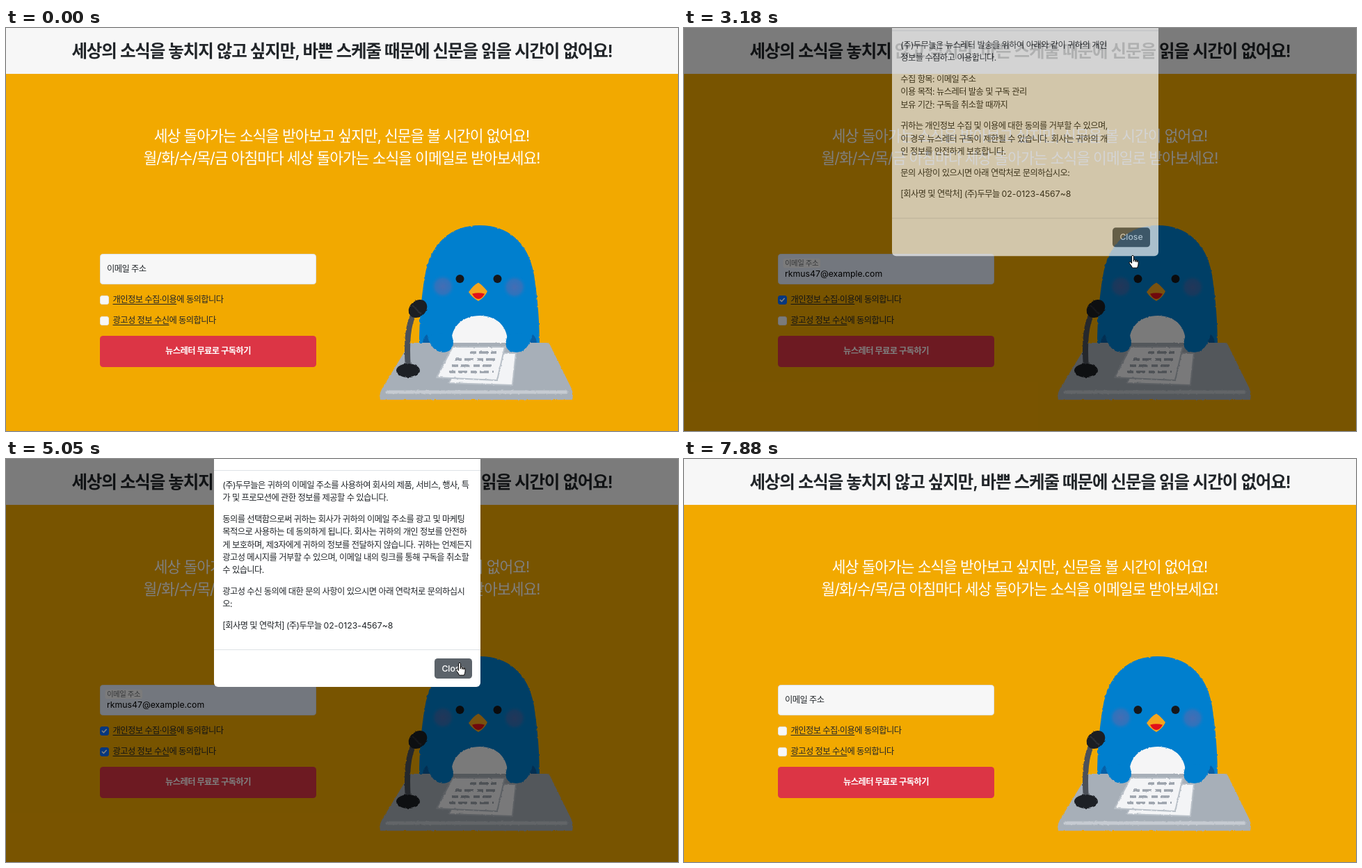
Write an HTML page that moves like this. It is 966 px wide and 580 px high and loops after 8000 ms.

```html
<!DOCTYPE html>
<html lang="ko">
<head>
<meta charset="utf-8">
<title>뉴스레터 구독</title>
<style>
html { font-size: 12.27px; }
html, body { margin: 0; width: 966px; height: 580px; overflow: hidden; }
body {
  position: relative; background: #f2a900; color: #212529;
  font: 1rem/1.5 Inter, "Noto Sans CJK KR", "Noto Sans CJK", sans-serif;
  white-space: nowrap;
}
body > * { letter-spacing: -.045em; }
body > *, .field > * { position: absolute; box-sizing: border-box; }
.latin { letter-spacing: 0; }
h1 {
  left: 0; top: 0; width: 966px; height: 66px; margin: 0; background: #f7f7f7;
  font-size: 2rem; font-weight: 600; line-height: 66px; text-align: center;
}
.lead { left: 0; top: 139px; width: 965px; color: #fff; font-size: 1.75rem; text-align: center; }
svg { overflow: visible; }
.art { left: 0; top: 0; }
.field {
  left: 135px; top: 324.5px; width: 311px; height: 44.5px;
  background: #f7f7f7; border: 1px solid #dee2e6; border-radius: 4.6px;
}
.field label { left: 9px; top: 12px; transform-origin: 0 50%; isolation: isolate; }
.field label::before {
  content: ""; position: absolute; z-index: -1; inset: 1px -3.5px;
  border-radius: 4px; background: #f7f7f7; opacity: var(--p);
}
.mail { left: 9px; top: 19.5px; color: #000; }
.box {
  left: 135px; width: 12.5px; height: 12.5px; border-radius: 3px;
  background: #f7f7f7; border: 1px solid #e6e6e6;
}
.box svg { position: absolute; left: -1px; top: -1px; display: none; }
.box.on { background: #0d6efd; border-color: #0d6efd; }
.box.on svg { display: block; }
.box.press { filter: brightness(.9); }
.box.ring { border-color: #86b7fe; box-shadow: 0 0 0 3px rgba(13,110,253,.25); }
.agree { left: 153.5px; }
u { text-underline-offset: 1.5px; text-decoration-thickness: 1px; }
.submit {
  left: 135px; top: 443px; width: 311px; height: 45px; border-radius: 4.6px;
  background: #dc3545; color: #fff; font-weight: 700; line-height: 44px; text-align: center;
}
.submit.hover { background: #bb2d3b; }
.shade { inset: 0; background: rgba(0,0,0,.5); }
.modal {
  left: 299px; top: -32px; width: 383px; background: #fff; border-radius: 6px;
}
.modal header { height: 47.5px; border-bottom: 1px solid #dee2e6; }
.modal section { padding: 1rem; }
.modal p { margin: 0 0 1rem; }
.modal footer { padding: 1rem; border-top: 1px solid #dee2e6; text-align: right; font-size: 0; }
.modal b { font-weight: 600; }
.btn {
  display: inline-block; padding: .43rem .82rem; border-radius: 4.6px;
  font-size: 1rem; color: #fff; font-weight: 500; background: #6c757d;
}
.btn.hover { background: #5c636a; }
.btn.ok { background: #0d6efd; font-weight: 600; }
.btn.ok.hover { background: #0b5ed7; }
.cursor { left: 0; top: 0; width: 1px; height: 1px; }
.cursor path { display: none; stroke: #000; stroke-width: 1; fill: #fff; stroke-linejoin: round; }
.cursor path.show { display: block; }
</style>
</head>
<body>
<h1>세상의 소식을 놓치지 않고 싶지만, 바쁜 스케줄 때문에 신문을 읽을 시간이 없어요!</h1>
<div class="lead">세상 돌아가는 소식을 받아보고 싶지만, 신문을 볼 시간이 없어요!<br>월/화/수/목/금 아침마다 세상 돌아가는 소식을 이메일로 받아보세요!</div>

<svg class="art" width="966" height="580">
  <defs>
    <filter id="rough" x="-5%" y="-5%" width="110%" height="110%" color-interpolation-filters="sRGB">
      <feTurbulence type="fractalNoise" baseFrequency=".25" numOctaves="2" seed="4"/>
      <feDisplacementMap in="SourceGraphic" scale="2.5" xChannelSelector="R" yChannelSelector="G"/>
    </filter>
    <radialGradient id="cheek">
      <stop offset="0" stop-color="#456db3"/>
      <stop offset=".6" stop-color="#3a70b8" stop-opacity=".8"/>
      <stop offset="1" stop-color="#007fce" stop-opacity="0"/>
    </radialGradient>
  </defs>
  <g filter="url(#rough)">
    <path fill="#007fce" d="M594 458C594 420 597 388 602 358C610 308 641 284 681 284C721 284 751 308 759 355C764 388 767 420 767 458Z"/>
    <path fill="#075fa6" d="M599 456Q599 445 605 441Q608 449 613 456ZM763 456Q763 445 757 441Q754 449 750 456Z"/>
    <path fill="#f5f5f6" d="M640 458C638 428 658 414 681 414C704 414 723 428 721 458Z"/>
    <path fill="#a7afb8" d="M584 453H777Q781 453 783 458L813 519Q816 527 814 535H538Q536 527 540 520L577 459Q580 453 584 453Z"/>
    <path stroke="#c6cbd2" stroke-width="5" stroke-linecap="round" d="M548 524H805"/>
    <path fill="#007fce" d="M606 445Q624 434 641 443Q646 458 638 464Q628 470 617 463Q610 457 606 445ZM756 445Q738 434 721 443Q715 458 723 464Q734 470 745 463Q752 457 756 445Z"/>
    <g fill="#f3f4f6" stroke="#b9c0c8" stroke-width="2" stroke-linejoin="round">
      <path d="M655 467L733 468L728 514L637 511Z"/>
      <path d="M642 459L717 459L706 507L619 503Z"/>
    </g>
    <path fill="none" stroke="#9ca3ac" stroke-width="3.4" stroke-dasharray="9 4 13 5" d="M667 467H705M646 477H704M641 486H703M637 495H701"/>
    <path fill="none" stroke="#4b5058" stroke-width="8" d="M578 490C576 462 576 428 587 410"/>
    <ellipse cx="578" cy="493" rx="17" ry="10" fill="#1d2025"/>
    <ellipse cx="592" cy="404" rx="14.5" ry="11.5" fill="#1b1e23" transform="rotate(-42 592 404)"/>
    <path stroke="#2c3036" stroke-width="2" d="M584 399L597 412"/>
  </g>
  <circle cx="628" cy="372" r="18" fill="url(#cheek)"/>
  <circle cx="731" cy="373" r="18" fill="url(#cheek)"/>
  <circle cx="652.5" cy="361" r="6" fill="#15171b"/>
  <circle cx="706.5" cy="361" r="6" fill="#15171b"/>
  <path fill="#f4a51e" d="M679 366.5Q685 370 692 379Q688 388 679 393Q670 388 665 380Q672 370 679 366.5Z"/>
  <path fill="#e2101a" d="M670 382.5Q679 380 688 382.5Q684 390 679 390Q674 390 670 382.5Z"/>
</svg>

<div class="field"><label>이메일 주소</label><span class="mail latin">rkmus47@example.com</span></div>
<div class="box" style="top:385px"></div>
<div class="agree" style="top:381.5px"><u>개인정보 수집·이용</u>에 동의합니다</div>
<div class="box" style="top:415px"></div>
<div class="agree" style="top:412px"><u>광고성 정보 수신</u>에 동의합니다</div>
<div class="submit">뉴스레터 무료로 구독하기</div>

<div class="shade"></div>
<div class="modal"><header></header><section>
  <p>(주)두무늘은 뉴스레터 발송을 위하여 아래와 같이 귀하의 개인<br>정보를 수집하고 이용합니다.</p>
  <p>수집 항목: 이메일 주소<br>이용 목적: 뉴스레터 발송 및 구독 관리<br>보유 기간: 구독을 취소할 때까지</p>
  <p>귀하는 개인정보 수집 및 이용에 대한 동의를 거부할 수 있으며,<br>이 경우 뉴스레터 구독이 제한될 수 있습니다. 회사는 귀하의 개<br>인 정보를 안전하게 보호합니다.</p>
  <p>문의 사항이 있으시면 아래 연락처로 문의하십시오:</p>
  <p>[회사명 및 연락처] (주)두무늘 <span class="latin">02-0123-4567~8</span></p>
</section><footer><span class="btn latin">Close</span></footer></div>
<div class="modal"><header></header><section>
  <p>(주)두무늘은 귀하의 이메일 주소를 사용하여 회사의 제품, 서비스, 행사, 특<br>가 및 프로모션에 관한 정보를 제공할 수 있습니다.</p>
  <p>동의를 선택함으로써 귀하는 회사가 귀하의 이메일 주소를 광고 및 마케팅<br>목적으로 사용하는 데 동의하게 됩니다. 회사는 귀하의 개인 정보를 안전하<br>게 보호하며, 제3자에게 귀하의 정보를 전달하지 않습니다. 귀하는 언제든지<br>광고성 메시지를 거부할 수 있으며, 이메일 내의 링크를 통해 구독을 취소할<br>수 있습니다.</p>
  <p>광고성 수신 동의에 대한 문의 사항이 있으시면 아래 연락처로 문의하십시<br>오:</p>
  <p>[회사명 및 연락처] (주)두무늘 <span class="latin">02-0123-4567~8</span></p>
</section><footer><span class="btn latin">Close</span></footer></div>
<div class="modal"><header></header><section>
  <p>입력하신 이메일 주소로 전송된 <b>메일 안의 링크를 클릭</b>하시면 인증이 완료됩<br>니다.</p>
  <p>5분 정도만 기다려주시면 구독한 내용을 받아보실 수 있습니다.</p>
  <p>만약 수신된 메일을 찾을 수 없다면 스팸 메일함을 확인하시거나 문제가 계<br>속되면 언제든지 페이지 우측 하단의 새솔담소 채널로 연락주세요.</p>
  <p>감사합니다.</p>
</section><footer><span class="btn ok">확인했습니다</span></footer></div>

<svg class="cursor">
  <path data-kind="arrow" d="M.5 .5V13.7L3.4 11L5.4 15.8L7.6 14.9L5.6 10.2H9.6Z"/>
  <path data-kind="beam" d="M-3-7.5H-1L0-6.5L1-7.5H3M0-6.5V6.5M-3 7.5H-1L0 6.5L1 7.5H3" style="fill:none"/>
  <path data-kind="hand" d="M-1.4 1.2Q0-.9 1.4 1.2V9V6.8Q2.7 5.5 3.9 7.2V9.5V7.2Q5.2 6.3 6.2 7.9V10V7.9Q7.7 7.3 8.1 9V13Q7.7 15.6 6.5 18.2H-.4Q-1.8 15-4.6 11.8Q-5.8 9.6-3.6 9.4L-1.4 11.4Z"/>
</svg>

<script>
const LOOP = 8000, START = 400, STEP = 98.4;
const all = s => [...document.querySelectorAll(s)];
const [field, label, mail, submit, shade, cursor] =
  ['.field', '.field label', '.mail', '.submit', '.shade', '.cursor'].map(s => all(s)[0]);
const boxes = all('.box'), modals = all('.modal'), shapes = all('.cursor path');
const clamp = v => Math.max(0, Math.min(1, v));

boxes.forEach(b => b.innerHTML =
  '<svg width="12.5" height="12.5"><path d="M3.4 6.5L5.4 8.5L9.2 4.3" fill="none" stroke="#fff" stroke-width="1.7" stroke-linecap="round" stroke-linejoin="round"/></svg>');

// pointer path: step, x, y, shape
const path = [
  [0, 654, 524, 'arrow'], [4, 358, 352, 'beam'], [7, 358, 352, 'beam'], [8, 350, 360, 'beam'],
  [9, 330, 375, 'arrow'], [12, 280, 406, 'arrow'], [14, 280, 406, 'arrow'], [22, 149, 388, 'arrow'],
  [23, 147, 387, 'arrow'], [24, 147, 387, 'arrow'], [27, 645, 327, 'hand'], [28, 645, 327, 'hand'],
  [29, 610, 334, 'arrow'], [32, 392, 387, 'arrow'], [34, 142, 420, 'arrow'], [36, 142, 420, 'arrow'],
  [38, 198, 419, 'arrow'], [39, 198, 419, 'arrow'], [44, 646, 284, 'arrow'], [45, 646, 284, 'arrow'],
  [46, 650, 292, 'hand'], [47, 652, 293, 'hand'], [48, 652, 293, 'hand'], [49, 610, 318, 'arrow'],
  [53, 366, 470, 'hand'], [56, 366, 470, 'hand'], [57, 390, 452, 'arrow'], [62, 648, 241, 'arrow'],
  [64, 653, 241, 'hand'], [65, 653, 241, 'hand'], [66, 645, 254, 'hand'], [68, 645, 250, 'hand'],
  [69, 645, 232, 'arrow'], [74, 640, 82, 'arrow'], [75, 669, 2, 'arrow'], [76, 672, -30, 'arrow']
];

// dialogs: opening step, steps to open, closing step, step of button hover
const dialogs = [[24, 3, 27, 27], [35, 3, 48, 46], [55, 1, 66, 61]];

function drawCursor(n) {
  const i = path.findLastIndex(k => k[0] <= n);
  const on = i >= 0 && i < path.length - 1;
  cursor.style.display = on ? 'block' : 'none';
  if (!on) return;
  const [a, x, y, kind] = path[i], [b, x2, y2] = path[i + 1];
  const u = (n - a) / (b - a), e = u * u * (3 - 2 * u);
  cursor.style.transform = `translate(${x + (x2 - x) * e}px,${y + (y2 - y) * e}px)`;
  shapes.forEach(s => s.classList.toggle('show', s.dataset.kind === kind));
}

function drawForm(n) {
  const live = n < 71;
  const float = live ? clamp((n - 6) / 2) : 0;
  const ring = n < 23 ? clamp((n - 6) / 2) : n === 23 ? .85 : 0;
  const filled = live && n >= 12;
  label.style.transform = `translateY(${-8.5 * float}px) scale(${1 - .15 * float})`;
  label.style.color = `rgba(33,37,41,${1 - .35 * float})`;
  label.style.setProperty('--p', float);
  mail.style.display = filled ? 'block' : 'none';
  field.style.background = filled ? '#e8f0fe' : '#f7f7f7';
  field.style.borderColor = ring ? '#86b7fe' : '#dee2e6';
  field.style.boxShadow = `0 0 0 3px rgba(13,110,253,${.25 * ring})`;
  boxes.forEach((b, i) => {
    const down = [23, 34][i];
    b.classList.toggle('press', n === down);
    b.classList.toggle('ring', n === down || n === down + 1);
    b.classList.toggle('on', live && n > down);
  });
  submit.classList.toggle('hover', n === 53 || n === 54);
}

function drawDialogs(n) {
  let dark = 0;
  dialogs.forEach(([open, rise, close, hover], i) => {
    const p = Math.min(clamp((n - open + 1) / rise), clamp(1 - (n - close) / 3));
    dark = Math.max(dark, Math.min(clamp((n - open + 1) / Math.min(rise, 2)), clamp(1 - (n - close - 3) / 2)));
    const m = modals[i];
    m.style.display = p ? 'block' : 'none';
    m.style.opacity = p;
    m.style.transform = `translateY(${-38 * (1 - p)}px)`;
    m.querySelector('.btn').classList.toggle('hover', n >= hover);
  });
  shade.style.opacity = dark;
}

function frame() {
  const t = performance.now() % LOOP;
  const n = Math.floor((t - START) / STEP);
  drawForm(n);
  drawDialogs(n);
  drawCursor(n);
  requestAnimationFrame(frame);
}
frame();
</script>
</body>
</html>
```
